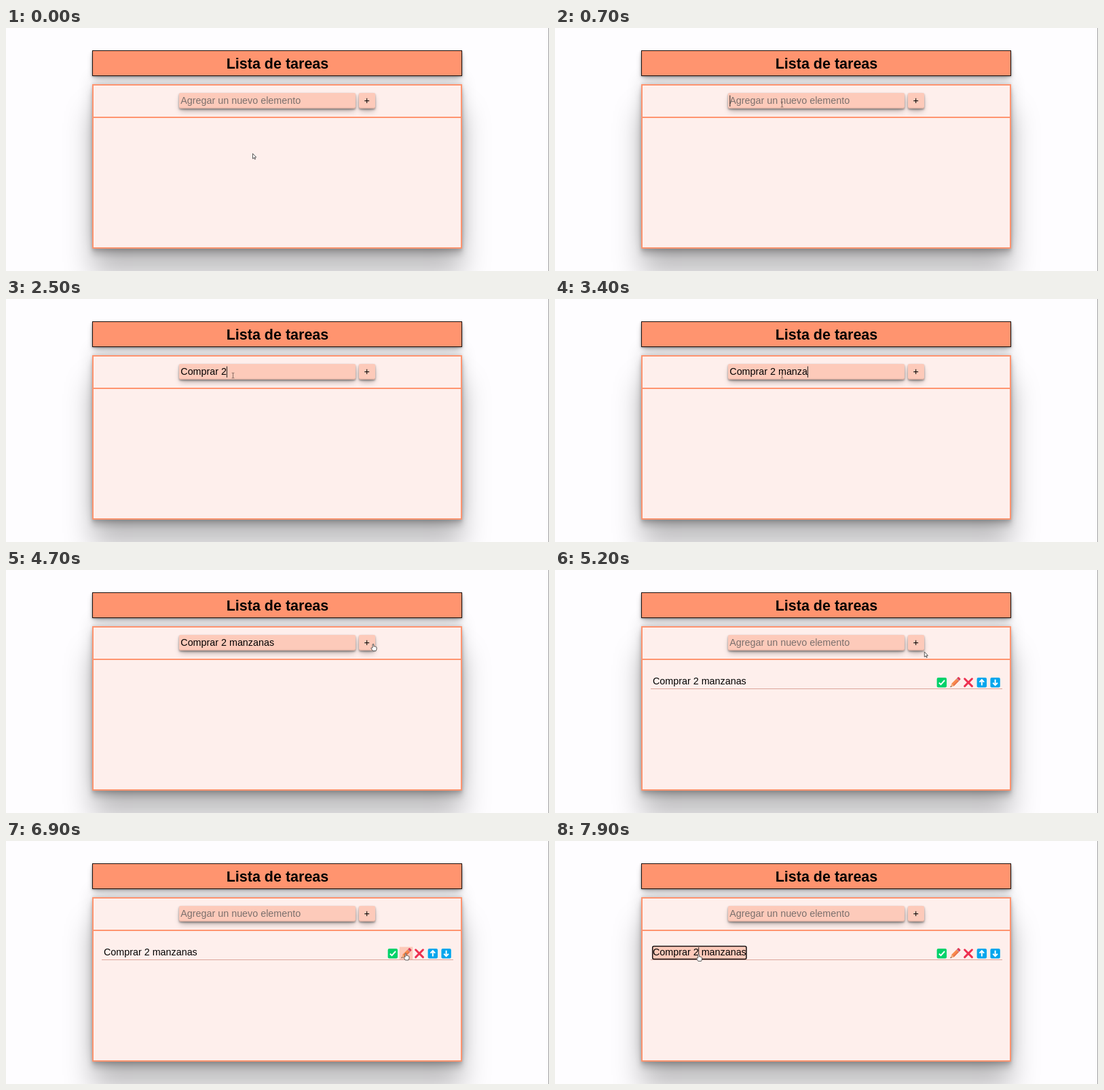
An HTML page for the animation above (8 s loop, 800 by 359 pixels).

```html
<!DOCTYPE html>
<html lang="es">
<head>
<meta charset="utf-8">
<title>Lista de tareas</title>
<style>
  html, body { margin: 0; width: 100%; height: 100%; overflow: hidden; background: #fefdff; }
  div, svg { position: absolute; box-sizing: border-box; }
  svg { left: 0; top: 0; font: 14.34px Arial, "Liberation Sans", sans-serif; }
  text { white-space: pre; }
  .raised { box-shadow: 0 1.4px 3px #0006, 0 5px 9px -2px #0000004d; }
  .field { top: 96px; height: 23px; border-radius: 2px; background: #fdcaba;
    box-shadow: 0 1.4px 3px #0006, 0 5px 9px -2px #0000004d, inset 0 -1.5px 0 #0000001a; }
  #header { left: 127px; top: 33px; width: 545px; height: 38px; background: #ff946f; border: 1.4px solid #1c100c; }
  #panel { left: 127px; top: 83px; width: 545px; height: 243px; background: #feefec; border: 2px solid #ff946f;
    box-shadow: 0 39px 39px #00000040, 0 -9px 22px #0000001f, 0 3px 4px #0000001f,
      0 9px 9px #0000002b, 0 -2px 4px #00000017; }
  #divider { left: 127px; top: 131px; width: 545px; height: 2px; background: #ff946f; }
  #edge { left: 799px; top: 0; width: 1px; height: 359px; background: #a3a2a4; }
</style>
</head>
<body>
<div id="panel"></div>
<div id="header" class="raised"></div>
<div id="divider"></div>
<div class="field" style="left:255px;width:260px"></div>
<div class="field" style="left:520px;width:24px"></div>
<div id="edge"></div>
<svg width="800" height="359" viewBox="0 0 800 359">
  <defs>
    <g id="box"><rect x="-7.2" y="-7.2" width="14.4" height="14.4" rx="2"/></g>
    <g id="arrowUp">
      <use href="#box" fill="#00a6ed"/>
      <path d="M0 4.4V-3.6M-3.4 -.6L0 -4L3.4 -.6" fill="none" stroke="#fff" stroke-width="2"/>
    </g>
  </defs>
  <text x="400" y="59.6" text-anchor="middle" font-size="21.5" font-weight="bold">Lista de tareas</text>
  <text x="531.8" y="112.3" text-anchor="middle">+</text>
  <text id="entry" x="257.3" y="112.4"></text>
  <g id="row">
    <path d="M141 175.5H659" stroke="#dba59b"/>
    <rect id="editor" x="143.5" y="155.5" width="138.5" height="19" rx="2" fill="#fdcaba"/>
    <rect id="ring" x="143.7" y="155.4" width="138.2" height="19.2" rx="2" fill="none" stroke="#151010" stroke-width="1.5"/>
    <text x="144" y="169.2">Comprar 2 manzanas</text>
    <path id="strike" d="M144 164.7H282" stroke="#000"/>
    <rect id="hover" y="156.5" width="19.6" height="18.5" fill="#fdc9b8"/>
    <g transform="translate(569.8 166.2)">
      <use href="#box" fill="#00d26a"/>
      <path d="M-4 .3L-1.3 3L4.2 -3.2" fill="none" stroke="#fff" stroke-width="1.9"/>
    </g>
    <g transform="translate(589.4 166.2) rotate(45)">
      <path d="M-2.5 -5.5H2.5V5H-2.5Z" fill="#f98a4c"/>
      <path d="M.7 -5.5H2.5V5H.7Z" fill="#e9724a"/>
      <path d="M-2.5 5H2.5L0 9.8Z" fill="#f3ad7a"/>
      <path d="M-.9 8.1H.9L0 9.8Z" fill="#4b3b46"/>
      <rect x="-2.5" y="-9.6" width="5" height="4" rx="1.3" fill="#e23a55"/>
      <path d="M-2.5 -6H2.5" stroke="#b89aa2" stroke-width="1.2"/>
    </g>
    <path d="M603.6 160.8L614.4 171.6M614.4 160.8L603.6 171.6" stroke="#ee3050" stroke-width="3" stroke-linecap="round"/>
    <use href="#arrowUp" transform="translate(628.8 166.2)"/>
    <use href="#arrowUp" transform="translate(648.6 166.2) rotate(180)"/>
  </g>
  <path id="caret" stroke="#222"/>
  <path id="pointer" stroke-width=".8" stroke-linejoin="round"/>
</svg>
<script>
const $ = id => document.getElementById(id);
const LOOP = 8000, STEP = 100;
const TASK = "Comprar 2 manzanas";
const KEY_TIMES = [1300, 1500, 1600, 1700, 1900, 2000, 2100, 2300, 2500, 2700,
  2900, 3100, 3200, 3300, 3400, 3500, 3600, 3700];
const FOCUS = 600, BLUR = 4700, ADDED = 5000, DONE = 6100, UNDONE = 6500, EDIT = 7200, EDIT_FOCUS = 7800;

// time, x, y of the pointer hotspot
const PATH = [
  [0, 363.5, 185.5], [100, 363.5, 185.5], [600, 334.5, 113],
  [4100, 334.5, 113], [4700, 541, 109], [5100, 541, 109],
  [5500, 562, 185], [5800, 571, 168], [6500, 571, 168],
  [6800, 589, 165.5], [7300, 589, 165.5], [7800, 211.5, 167], [8000, 211.5, 167]
];
const ARROW = "M0 0V7.6L1.8 6L3 8.6L4.1 8.1L2.9 5.5H5.2Z";
const HAND = "M-.9 6V.8Q0 -.5 .9 .8V4L2.4 3.9L3.8 4.4L5 5.2V8L4 10.5H-.6L-3.2 6.6Q-2.8 5.2 -1.6 6.2Z";
const IBEAM = "M-1.8 -3.8H-.4L0 -3.4L.4 -3.8H1.8M0 -3.4V3.4M-1.8 3.8H-.4L0 3.4L.4 3.8H1.8";

const measure = document.createElement("canvas").getContext("2d");
measure.font = '14.34px Arial, "Liberation Sans", sans-serif';
const textWidth = s => measure.measureText(s).width;
const show = (id, on) => $(id).style.display = on ? "" : "none";
const inside = (x, y, l, t, r, b) => x >= l && x <= r && y >= t && y <= b;

function pointerAt(t) {
  const i = PATH.findIndex(p => p[0] > t);
  const [t0, x0, y0] = PATH[i - 1], [t1, x1, y1] = PATH[i];
  const u = (t - t0) / (t1 - t0), k = u * u * (3 - 2 * u);
  return [x0 + (x1 - x0) * k, y0 + (y1 - y0) * k];
}

function drawPointer(t) {
  const [x, y] = pointerAt(t);
  const onIcon = t >= ADDED && inside(x, y, 560, 156, 659, 175);
  const onText = t >= EDIT && inside(x, y, 143, 155, 282, 175);
  const onInput = inside(x, y, 255, 96, 515, 120);
  const onButton = inside(x, y, 520, 96, 544, 120);
  show("hover", onIcon);
  $("hover").setAttribute("x", 560 + 19.7 * Math.floor((x - 560) / 19.7));
  const pointer = $("pointer");
  pointer.setAttribute("d", onInput ? IBEAM : onIcon || onText || onButton ? HAND : ARROW);
  pointer.setAttribute("fill", onInput ? "none" : "#fff");
  pointer.setAttribute("stroke", onInput ? "#6b5650" : "#333");
  pointer.setAttribute("transform", `translate(${x} ${y})`);
}

function draw(t) {
  const count = t < ADDED ? KEY_TIMES.filter(k => k <= t).length : 0;
  const typed = TASK.slice(0, count);
  $("entry").textContent = typed || "Agregar un nuevo elemento";
  $("entry").setAttribute("fill", typed ? "#000" : "#7b706d");

  const lastKey = count ? KEY_TIMES[count - 1] : FOCUS;
  const typing = t >= FOCUS && t < BLUR && (t - lastKey) % 1000 < 500;
  const editing = t >= EDIT_FOCUS;
  show("caret", typing || editing);
  $("caret").setAttribute("d", editing
    ? `M${144 + textWidth("Comprar 2")} 157V173`
    : `M${257.8 + textWidth(typed)} 99.5V116`);

  show("row", t >= ADDED);
  show("strike", t >= DONE && t < UNDONE);
  show("editor", t >= EDIT);
  show("ring", editing);
  drawPointer(t);
}

function tick() {
  const t = performance.now() % LOOP;
  draw(Math.floor(t / STEP) * STEP);
  requestAnimationFrame(tick);
}
tick();
</script>
</body>
</html>
```
